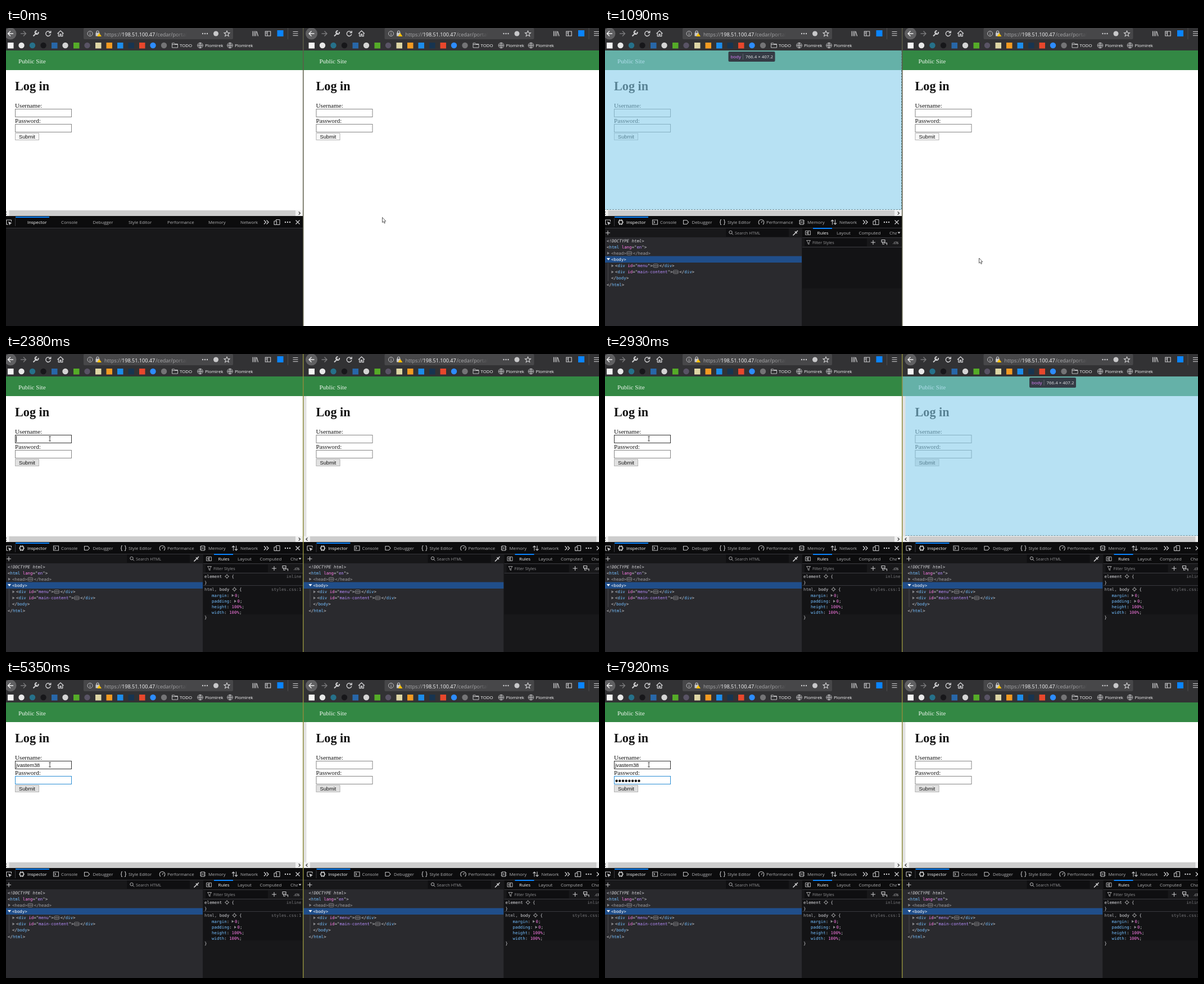
Write an HTML page with a canvas that moves like this. It is 1055 px wide and 531 px high and loops after 8000 ms.

```html
<!DOCTYPE html>
<html lang="en">
<head>
<meta charset="utf-8">
<title>Two login windows</title>
<style>
html, body { margin: 0; width: 100%; height: 100%; overflow: hidden; background: #fff; }
canvas { display: block; }
</style>
</head>
<body>
<canvas width="1055" height="531"></canvas>
<script>
const c = document.querySelector('canvas').getContext('2d');
const LOOP = 8000, SECOND_X = 535.5;
const UI = '"Open Sans", sans-serif', SERIF = '"Liberation Serif", serif';
const FORM = '"Liberation Sans", sans-serif', MONO = '7.4px "DejaVu Sans Mono", monospace';
const USER = 'jvastem38', SITE = 'Plomirek';
const LIGHT = '#d7d7db', BLUE = '#75bfff', PINK = '#ff7de9', VIOLET = '#b98eff', GRAY = '#939395';

const rect = (x, y, w, h, color) => { c.fillStyle = color; c.fillRect(x, y, w, h); };
const frame = (x, y, w, h, color) => {
  c.strokeStyle = color; c.lineWidth = 1; c.strokeRect(x + .5, y + .5, w - 1, h - 1);
};
const round = (x, y, w, h, r, color) => {
  c.fillStyle = color; c.beginPath(); c.roundRect(x, y, w, h, r); c.fill();
};
const disc = (x, y, r, color) => { c.fillStyle = color; c.beginPath(); c.arc(x, y, r, 0, 7); c.fill(); };
const text = (s, x, y, font, color, align = 'left') => {
  c.font = font; c.fillStyle = color; c.textAlign = align; c.fillText(s, x, y);
};
const ui = (s, x, y, size, color) => text(s, x, y, size + 'px ' + UI, color);
const line = (x, y, d, color = '#d0d0d2', width = 1) => {
  c.save(); c.translate(x, y);
  c.strokeStyle = color; c.lineWidth = width; c.stroke(new Path2D(d));
  c.restore();
};
const shape = (x, y, d, color) => {
  c.save(); c.translate(x, y); c.fillStyle = color; c.fill(new Path2D(d)); c.restore();
};
const dots = (x, y) => [-4, 0, 4].forEach(d => disc(x + d, y, 1.2, '#d0d0d2'));
const RING = r => `M${r} 0A${r} ${r} 0 1 1 ${-r} 0A${r} ${r} 0 1 1 ${r} 0`;
const PLUS = 'M-4 0H4M0 -4V4';

// Runs of [text, colour]; 'badge', 'gear' and 'twisty' without a colour draw symbols.
function code(x, y, ...runs) {
  for (const [s, color] of runs) {
    if (color) {
      text(s, x, y, MONO, color);
      x += c.measureText(s).width;
    } else if (s === 'badge') {
      c.strokeStyle = '#9a9a9e'; c.lineWidth = .8;
      c.beginPath(); c.roundRect(x + 1, y - 5.5, 9, 6, 2); c.stroke();
      [3, 5.5, 8].forEach(d => disc(x + d, y - 2.5, .75, LIGHT));
      x += 12;
    } else if (s === 'gear') {
      line(x + 4.5, y - 2.5, RING(2.4) + 'M-4 0H-2.4M2.4 0H4M0 -4V-2.4M0 2.4V4', '#b1b1b3', .9);
      x += 13;
    } else {
      shape(x, y - 5, 'M0 0L4 2.5L0 5Z', '#8a8a8e');
      x += 5.5;
    }
  }
}

function globe(x) {
  line(x, 31, RING(4.8) + 'M-4.8 0H4.8M0 -4.8V4.8M0 -4.8Q-4.5 0 0 4.8Q4.5 0 0 -4.8', '#d0d0d2', .8);
}

function browserBars() {
  rect(-7, 0, 550, 40, '#323234');
  disc(8, 10, 10.5, '#606062');
  line(8, 10, 'M5 0H-4.5M0 -4.5L-4.5 0L0 4.5', '#f0f0f0', 1.4);
  line(31, 10, 'M-5 0H4.5M0 -4.5L4.5 0L0 4.5', '#7a7a7c', 1.4);
  line(53, 10, 'M-4.5 4.5L1.5 -1.5M4.5 -3A3 3 0 1 1 2 -5', '#d0d0d2', 2);
  line(75, 10, 'M3.5 -2.5A4.3 4.3 0 1 0 4.3 1M4.7 -5V-1.5H1', '#d0d0d2', 1.4);
  line(97, 10, 'M-5.5 0L0 -5L5.5 0M-3.7 -1V4.7H-1V1H1V4.7H3.7V-1', '#d0d0d2', 1.3);

  round(138, 0, 266, 20, 2, '#474749');
  line(149.5, 10, RING(4.5) + 'M0 -.7V3M0 -3V-1.8', '#c8c8ca', .9);
  rect(159.5, 8.5, 7, 6, '#c8c8ca');
  line(163, 8, 'M-2 1V-1A2 2 0 0 1 2 -1V1', '#c8c8ca', 1.2);
  shape(166, 10, 'M0 -1L4 5H-4Z', '#ffbf00');
  ui('https://', 175, 14.5, 9.1, '#a8a8aa');
  ui('198.51.100.47', 206, 14.5, 9.1, '#f9f9fa');
  const fade = c.createLinearGradient(300, 0, 322, 0);
  fade.addColorStop(0, '#a8a8aa'); fade.addColorStop(1, '#474749');
  ui('/cedar/portal', 266, 14.5, 9.1, fade);
  dots(354, 10);
  disc(373.5, 10, 4.5, '#c8c8ca');
  line(393, 10, 'M0 -5L1.5 -1.6L5 -1.4L2.3 1L3.2 4.6L0 2.6L-3.2 4.6L-2.3 1L-5 -1.4L-1.5 -1.6Z', '#d0d0d2', 1.1);
  line(443, 10, 'M-4 -4.5V4.5M-1.3 -4.5V4.5M1.4 -4.5V4.5M3 -4L5.5 4.5', '#d0d0d2', 1.2);
  line(466, 10, 'M-4.7 -4H4.7V4H-4.7ZM-1 -4V4M-3.5 -2H-2M-3.5 0H-2', '#d0d0d2', 1.1);
  rect(482.5, 4, 11, 11, '#0a84ff');
  rect(501, 0, 1, 20, '#4c4c4e');
  line(515, 10, 'M-4.5 -3.5H4.5M-4.5 0H4.5M-4.5 3.5H4.5', '#d0d0d2', 1.2);

  const marks = ['s#f4f4f4', 'c#e8e8e8', 'c#26718a', 'c#17171a', 's#2867a8', 'c#d4d4d4', 's#55ab28', 'c#595365',
    's#ded6a5', 's#f39a22', 's#1c8cea', 's#173450', 's#e8472c', 'c#2d8cff', 'c#747476'];
  marks.forEach((m, i) => {
    const x = 8 + i * 19.5, color = m.slice(1);
    if (m[0] === 's') rect(x - 5, 26, 10.5, 10.5, color); else disc(x, 31, 5.2, color);
  });
  line(300.5, 31, 'M-5 4V-4H-1L0 -2.5H5V4ZM-5 -1.5H5', '#d0d0d2', .9);
  ui('TODO', 309, 34.3, 7.9, '#f9f9fa');
  globe(345.5); ui(SITE, 354, 34.3, 7.9, '#f9f9fa');
  globe(398.5); ui(SITE, 407, 34.3, 7.9, '#f9f9fa');
}

function page(w) {
  rect(-7, 40, 550, 491, '#fff');
  rect(-7, 40, 550, 35, '#338844');
  text('Public Site', 22, 63, '11.15px ' + SERIF, '#eef6ef');
  text('Log in', 16, 111, 'bold 22.2px ' + SERIF, '#111');
  text('Username:', 16, 141.5, '11.15px ' + SERIF, '#111');
  text('Password:', 16, 169, '11.15px ' + SERIF, '#111');
  for (const y of [144, 171]) { rect(16, y, 101, 15, '#fff'); frame(16, y, 101, 15, '#858585'); }
  rect(16, 187, 43, 13, w.grayButton ? '#e1e1e1' : '#f8f8f8');
  frame(16, 187, 43, 13, '#b4b4b4');
  text('Submit', 23, 197, '9.27px ' + FORM, '#111');
}

function highlight() {
  rect(-7, 40, 550, 284, 'rgba(135,206,235,.6)');
  c.setLineDash([3, 2]);
  line(0, 0, 'M-7 323.5H543M527.5 40V335', '#5c7f8a', .9);
  c.setLineDash([]);
  round(219.5, 42, 83, 18, 2, '#353b45');
  ui('body', 223.5, 54, 7.9, '#df80ff');
  rect(245, 46, 1, 10, '#60656e');
  ui('766.4 × 407.2', 250, 54, 7.9, '#e4e6e9');
}

const TABS = [
  ['Inspector', 38, 28, 'M-3 -3H3V3H-3ZM-1.5 -5V-3M1.5 -5V-3M-1.5 3V5M1.5 3V5M-5 0H-3M3 0H5'],
  ['Console', 98, 89, 'M-4.5 -4H4.5V4H-4.5ZM-2.5 -2L-.5 0L-2.5 2'],
  ['Debugger', 154.5, 144, 'M-4.5 -3.5H1.5L4.5 0L1.5 3.5H-4.5Z'],
  ['Style Editor', 218, 209, 'M-2 -4.5Q-4 -4.5 -3.6 -2Q-3.5 0 -5 0Q-3.5 0 -3.6 2Q-4 4.5 -2 4.5M2 -4.5Q4 -4.5 3.6 -2Q3.5 0 5 0Q3.5 0 3.6 2Q4 4.5 2 4.5'],
  ['Performance', 287, 278, 'M-3 4A4.8 4.8 0 1 1 3 4M0 1L2 -2'],
  ['Memory', 360, 350, 'M-3 -4H3V4H-3ZM-5 -2.5H-3M-5 0H-3M-5 2.5H-3M3 -2.5H5M3 0H5M3 2.5H5M0 -2V2'],
  ['Network', 417, 407, 'M-2.5 4.5V-4M-5 -1.5L-2.5 -4L0 -1.5M2.5 -4.5V4M0 1.5L2.5 4L5 1.5']
];

function markup() {
  rect(-7, 357, 357, 16, '#18181a');
  rect(215, 357, 112, 15, '#0f0f11');
  line(5, 365, PLUS);
  line(223.5, 364, RING(2.7) + 'M2 2L4.5 4.5', '#b1b1b3');
  ui('Search HTML', 231, 367.8, 7.4, GRAY);
  line(339, 365, 'M-4.5 4.5L1 -1M-1 -2.5L2.5 1M1 -1L4 -4', '#d0d0d2', 1.6);
  rect(-7, 373, 357, 158, '#2a2a2e');
  rect(-7, 406.5, 357, 11.5, '#204e8a');
  const open = (name, attr, value) =>
    [['<', LIGHT], [name, BLUE], [' ' + attr, PINK], ['="', LIGHT], [value, VIOLET], ['">', LIGHT]];
  const close = name => [['</', LIGHT], [name, BLUE], ['>', LIGHT]];
  text('<!DOCTYPE html>', 3, 381.7, 'italic ' + MONO, LIGHT);
  code(3, 392.8, ...open('html', 'lang', 'en'));
  code(4, 403.8, ['twisty']);
  code(11, 403.8, ['<head>', '#a0a0a4'], ['badge'], ['</head>', '#a0a0a4']);
  shape(3, 410, 'M0 0H6L3 4Z', '#fff');
  code(11, 415, ['<body>', '#fff']);
  rect(5, 419, 1, 32, '#48484c');
  [['menu', 426.2], ['main-content', 437.2]].forEach(([id, y]) => {
    code(11.5, y, ['twisty']);
    code(18, y, ...open('div', 'id', id), ['badge'], ...close('div'));
  });
  code(11, 448.4, ...close('body'));
  code(3, 459.6, ...close('html'));
}

function sidebar(rules) {
  rect(350, 357, 190, 174, '#18181a');
  rect(351, 357, 190, 16, '#0c0c0d');
  rect(351, 390, 190, 74, '#131315');
  line(361, 365, 'M-4.5 -3.5H4.5V3.5H-4.5ZM1 -3.5V3.5M-3 0L-.5 -2V2Z', '#c0c0c2', .9);
  rect(370, 356, 34, 2, '#0a84ff');
  ui('Rules', 377.5, 367.5, 7.9, '#fff');
  ui('Layout', 412, 367.5, 7.9, '#b1b1b3');
  ui('Computed', 451.5, 367.5, 7.9, '#b1b1b3');
  ui('Cha', 506, 367.5, 7.9, '#b1b1b3');
  rect(519, 358, 20, 14, '#0c0c0d');
  shape(520.5, 363.5, 'M0 0H5L2.5 3Z', '#d0d0d2');
  rect(351, 373, 190, 1, '#38383d');
  rect(355, 375, 111, 14, '#0f0f11');
  line(362, 381.5, 'M-3.5 -3H3.5L1 .5V4L-1 3V.5Z', '#b1b1b3', .9);
  ui('Filter Styles', 369, 384.5, 7.3, GRAY);
  line(477, 382, PLUS);
  line(497, 382, 'M-5 -4.5H1V-.5H-5ZM-1 1H4.5V4.5M-3 0V3H0', '#d0d0d2', 1.1);
  ui('.cls', 511.5, 384.5, 7.3, '#d0d0d2');
  rect(351, 390, 190, 1, '#38383d');
  if (!rules) return;
  code(353, 398.8, ['element ', LIGHT], ['gear'], ['{', LIGHT]);
  text('inline', 525.5, 398.8, MONO, '#77777a', 'right');
  code(353, 409.5, ['}', LIGHT]);
  rect(351, 412, 190, 1, '#38383d');
  code(353, 421.8, ['html, ', '#a8a8ac'], ['body ', LIGHT], ['gear'], ['{', LIGHT]);
  text('styles.css:1', 525.5, 421.8, MONO, '#77777a', 'right');
  [['margin', '0'], ['padding', '0'], ['height', '100%'], ['width', '100%']].forEach(([name, value], i) => {
    const twisty = i < 2 ? [['twisty']] : [];
    code(366, 432.7 + i * 10.2, [name, BLUE], [': ', LIGHT], ...twisty, [value, PINK], [';', LIGHT]);
  });
  code(353, 472.3, ['}', LIGHT]);
}

function devtools(w) {
  rect(-7, 324.5, 550, 10.5, '#f0f0f0');
  rect(5.5, 325, 509.5, 10, '#cdcdcd');
  line(0, 330, 'M1 -2.7L-1.7 0L1 2.7', '#333', 1.2);
  line(522, 330, 'M-1.3 -2.7L1.4 0L-1.3 2.7', '#333', 1.2);
  rect(-7, 335, 550, 196, '#18181a');
  rect(-7, 335, 550, 21, '#0c0c0d');
  rect(-7, 356, 550, 1, '#38383d');
  line(5, 346, 'M4.5 -1V-4H-4.5V4H-1', '#d0d0d2');
  shape(5, 346, 'M-1 -1L5.5 1.5L2.8 2.8L1.5 5.5Z', '#d0d0d2');
  rect(16, 339, 1, 14, '#38383d');
  rect(17, 336, 60, 2, '#0a84ff');
  TABS.forEach(([name, x, iconX, d], i) => {
    ui(name, x, 349.3, 7.85, i ? '#b1b1b3' : '#fff');
    if (w.icons) line(iconX, 346, d, i ? '#c0c0c2' : '#fff', 1.1);
  });
  line(463, 346, 'M-4 -3.5L-.5 0L-4 3.5M.5 -3.5L4 0L.5 3.5', '#d0d0d2', 1.3);
  line(482, 346, 'M-1.5 -2V-4.5H5V4.5H0M-5 -2H-.5V4.5H-5Z');
  dots(501, 346);
  line(519, 346, 'M-3.5 -3.5L3.5 3.5M3.5 -3.5L-3.5 3.5', '#d0d0d2', 1.3);
  if (w.markup) markup();
  if (w.sidebar) sidebar(w.rules);
}

function browser(x, left, right, w) {
  c.save();
  c.beginPath(); c.rect(left, 0, right - left, 531); c.clip();
  c.translate(x, 0);
  page(w);
  if (w.form) w.form();
  if (w.overlay) highlight();
  if (w.hover) frame(16, 144, 101, 15, w.overlay ? '#47626c' : '#333');
  if (w.strip) rect(-7, 75, 6, 250, '#e2e2e2');
  browserBars();
  if (w.tools) devtools(w);
  c.restore();
}

function fields(t) {
  const caret = (x, y) => rect(x, y, 1, 11, '#111');
  if (t < 3880) {
    if (t >= 2100 && (t < 2930 || t >= 3450)) caret(18, 146);
    return;
  }
  text(t < 4620 ? USER[0] : USER, 18, 155, '9.27px ' + FORM, '#111');
  if (t >= 4060 && t < 4620) {
    rect(17, 158, 100, 17, 'rgba(0,0,0,.25)');
    rect(16, 158, 100, 15, t < 4470 ? '#fff' : '#e2e2e4');
    frame(16, 158, 100, 15, '#c4c4c4');
    ui(USER, 19.5, 168.7, 7.9, '#111');
  }
  if (t < 4770) return;
  frame(16, 171, 101, 15, '#2a8dd4');
  const typed = t < 6430 ? 0 : t >= 7520 ? 8 : Math.min(7, 1 + Math.floor((t - 6430) / 156));
  for (let i = 0; i < typed; i++) disc(20.6 + i * 5.7, 179.8, 2.2, '#111');
  const blinkOff = t >= 5350 && t < 5900 || t >= 7920;
  if (!blinkOff) caret(18 + typed * 5.7, 173);
}

function pointer(t) {
  const mix = (a, b, from, to) => a + (b - a) * Math.min(1, Math.max(0, (t - from) / (to - from)));
  if (t >= 1750) {
    line(78, 151, 'M-2 -4H2M0 -4V4M-2 4H2', '#333', .9);
    return;
  }
  const x = mix(mix(669.5, 665.5, 120, 1090), 78, 1240, 1820);
  const y = mix(mix(337.5, 410, 120, 1090), 151, 1240, 1820);
  const arrow = 'M0 0V9L2 7.2L3.5 10.5L5 9.8L3.6 6.7H6.3Z';
  shape(x, y, arrow, '#fff');
  line(x, y, arrow, '#333', .8);
}

function draw() {
  const t = performance.now() % LOOP;
  const grayButton = t >= 2100;
  browser(0, 0, 528, {
    grayButton, tools: true, icons: t >= 280, markup: t >= 600, sidebar: t >= 930, rules: t >= 1240,
    overlay: t >= 760 && t < 2100, hover: t >= 1820, form: () => fields(t)
  });
  browser(SECOND_X, 529, 1055, {
    grayButton, tools: t >= 1430, icons: t >= 1820, markup: t >= 2380, sidebar: t >= 2380, rules: t >= 2670,
    overlay: t >= 2670 && t < 3450, strip: t >= 2100
  });
  rect(528, 0, 1.5, 531, t < 1240 ? '#5c5c48' : '#8c8b3c');
  pointer(t);
  requestAnimationFrame(draw);
}
draw();
</script>
</body>
</html>
```
